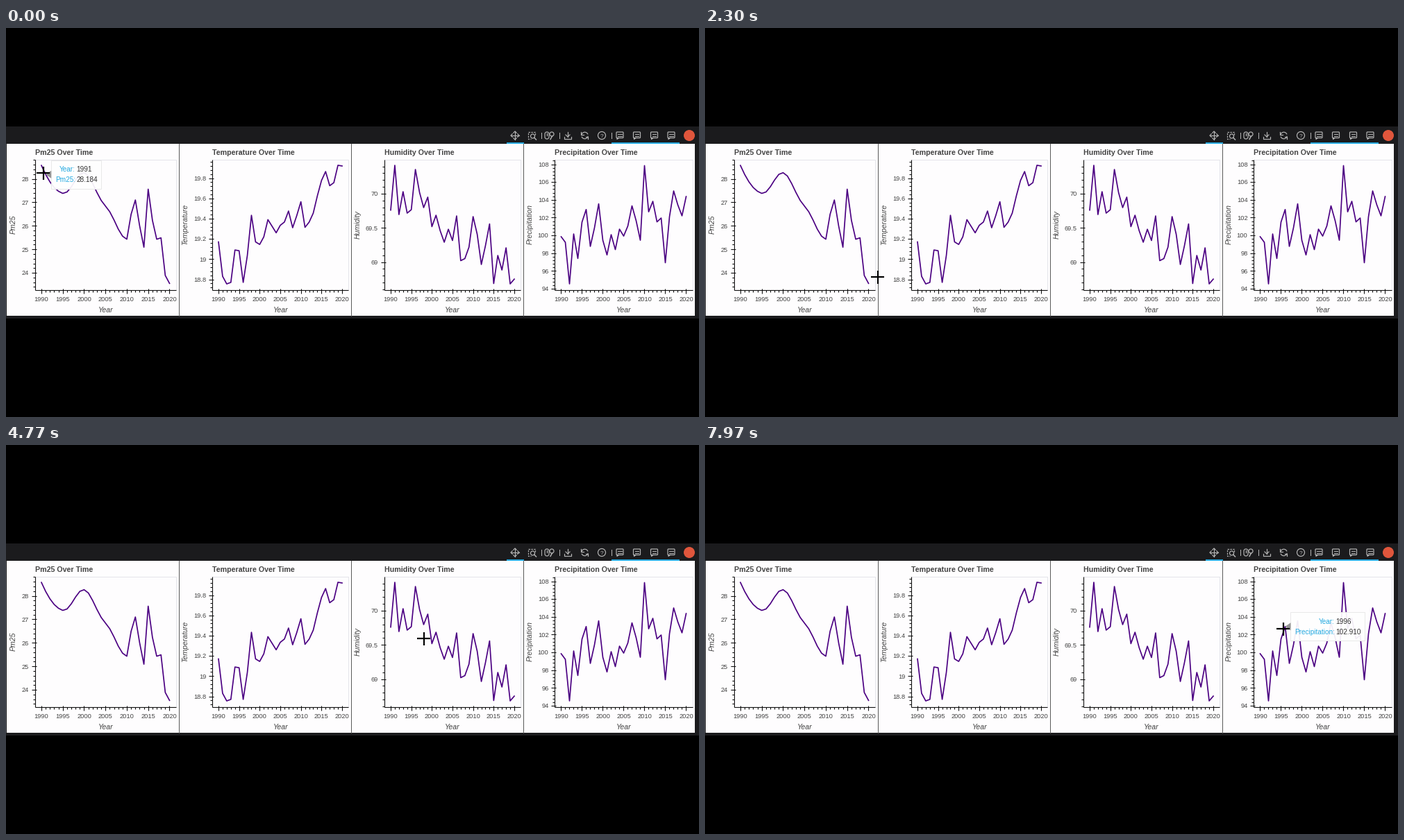
These frames come from a looping animation (998 by 561 pixels, 8 s). A matplotlib script:

```python
import numpy as np
import matplotlib.pyplot as plt
from matplotlib.animation import FuncAnimation
from matplotlib.collections import LineCollection
from matplotlib.patches import Arc, Circle, FancyBboxPatch, Polygon, Rectangle

W, H, DPI = 998, 561, 100
FRAMES, STEP = 250, 32
PX = 72 / DPI
INK, GREY, BLUE, INDIGO = "#444444", "#b4b4b4", "#26aae1", "#4b0082"
TOP, BOTTOM = 190, 377.5
HIT = 2.6

plt.rcParams["font.family"] = "Liberation Sans"
fig = plt.figure(figsize=(W / DPI, H / DPI), dpi=DPI, facecolor="black")
ax = fig.add_axes([0, 0, 1, 1])
ax.set_xlim(0, W)
ax.set_ylim(H, 0)
ax.axis("off")


def rect(x0, y0, x1, y1, color, **kw):
    return ax.add_patch(Rectangle((x0, y0), x1 - x0, y1 - y0, fc=color, lw=0, **kw))


def stroke(points, color=GREY, width=1.2, **kw):
    xs, ys = zip(*points)
    return ax.plot(xs, ys, color=color, lw=width * PX, **kw)[0]


def label(x, y, text, size, color=INK, **kw):
    return ax.text(x, y, text, fontsize=size * PX, color=color, **kw)


def ring(x, y, r):
    ax.add_patch(Circle((x, y), r, fill=False, ec=GREY, lw=1.2 * PX))


def round_box(x0, y0, x1, y1, r):
    shape = f"round,pad=0,rounding_size={r}"
    ax.add_patch(FancyBboxPatch((x0, y0), x1 - x0, y1 - y0, boxstyle=shape,
                                fill=False, ec=GREY, lw=1.2 * PX))


class Chart:
    """One line chart: frame edges, pixel scales, tick step and values."""

    def __init__(self, name, left, right, x_ends, y_ref, step, digits, base, values):
        self.name, self.left, self.right = name, left, right
        self.years = np.arange(1990, 2021)
        self.values = np.array(values)
        self.x = np.linspace(*x_ends, 31)
        self.ref, self.y0, self.scale = y_ref
        self.y = self.to_y(self.values)
        self.pts = np.column_stack([self.x, self.y])
        self.draw(step, digits, base)

    def to_y(self, v):
        return self.y0 + (self.ref - v) * self.scale

    def draw(self, step, digits, base):
        left, right = self.left, self.right
        mid = (left + right) / 2
        stroke([(left, TOP), (right, TOP), (right, BOTTOM)], "#e4e4ea", 1)
        label(left, 182.8, f"{self.name} Over Time", 10.65, weight="bold")
        label(mid, 410, "Year", 10.5, style="italic", ha="center")
        label(base, 283, self.name, 10.5, style="italic", rotation=90,
              rotation_mode="anchor", ha="center", va="baseline")

        segs = [[(left, TOP), (left, BOTTOM)], [(left, BOTTOM), (right, BOTTOM)]]
        for i, x in enumerate(self.x):
            major = i % 5 == 0
            segs.append([(x, BOTTOM - 2 * major), (x, BOTTOM + (5 if major else 3.3))])
            if major:
                label(x, 394.2, str(1990 + i), 9.3, ha="center")
        for k in range(-80, 81):
            v = self.ref + k * step / 5
            y = self.to_y(v)
            if not TOP <= y <= BOTTOM:
                continue
            major = k % 5 == 0
            segs.append([(left - (5 if major else 3.3), y), (left + 2 * major, y)])
            if major:
                text = f"{v:.{digits}f}"
                text = text.rstrip("0").rstrip(".") if digits else text
                label(left - 9, y + 3.3, text, 9.3, ha="right")
        ax.add_collection(LineCollection(segs, colors="#111111", linewidths=1.1 * PX))
        stroke(self.pts, INDIGO, 1.7, solid_joinstyle="round")

    def hit(self, p):
        """Index of the nearest point if p lies on the line, else None."""
        a, d = self.pts[:-1], np.diff(self.pts, axis=0)
        t = np.clip(((p - a) * d).sum(1) / (d * d).sum(1), 0, 1)
        gap = np.hypot(*(a + t[:, None] * d - p).T)
        if gap.min() > HIT:
            return None
        return int(np.hypot(*(self.pts - p).T).argmin())


# Page and toolbar
rect(0, 142, W, 419, "#1b1b1d")
rect(1, 167, 992, 415, "#fefdfe")
for x in (249, 497, 745):
    stroke([(x, 167), (x, 415)], "#5a5a5a", 1)
for x0, x1 in ((721, 746), (872, 970)):
    rect(x0, 165, x1, 167, BLUE)
for x in (771, 797, 872.5):
    stroke([(x, 151), (x, 159)], GREY, 1)


def pan_icon(x, y):
    stroke([(x - 6, y), (x + 6, y)])
    stroke([(x, y - 6), (x, y + 6)])
    for dx, dy in ((1, 0), (-1, 0), (0, 1), (0, -1)):
        tip = np.array([x + 6 * dx, y + 6 * dy])
        back, side = 2.2 * np.array([dx, dy]), 2.2 * np.array([dy, dx])
        stroke([tip - back + side, tip, tip - back - side])


def box_zoom_icon(x, y):
    stroke([(x + 5, y - 1), (x + 5, y - 5), (x - 5, y - 5), (x - 5, y + 5), (x - 1, y + 5)],
           linestyle=(0, (2, 1.2)))
    ring(x + 1, y + 1, 3)
    stroke([(x + 3.2, y + 3.2), (x + 6, y + 6)], width=1.5)


def wheel_zoom_icon(x, y):
    round_box(x - 6.5, y - 5, x - 0.5, y + 5, 2.9)
    stroke([(x - 3.5, y - 3), (x - 3.5, y - 0.5)])
    ring(x + 3.5, y - 2, 3)
    stroke([(x + 4, y + 1), (x + 1.5, y + 5.5)], width=1.5)


def save_icon(x, y):
    stroke([(x, y - 5.5), (x, y + 2)])
    stroke([(x - 3, y - 1), (x, y + 2), (x + 3, y - 1)])
    stroke([(x - 5, y + 2), (x - 5, y + 5), (x + 5, y + 5), (x + 5, y + 2)])


def reset_icon(x, y):
    for start in (10, 190):
        ax.add_patch(Arc((x, y), 9.5, 9.5, theta1=start, theta2=start + 150,
                         ec=GREY, lw=1.2 * PX))
    stroke([(x - 5, y - 5), (x - 5, y - 1.5), (x - 1.5, y - 1.5)])
    stroke([(x + 5, y + 5), (x + 5, y + 1.5), (x + 1.5, y + 1.5)])


def help_icon(x, y):
    ring(x, y, 5.5)
    label(x, y + 3, "?", 8.5, GREY, ha="center")


def hover_icon(x, y):
    round_box(x - 5, y - 5, x + 5, y + 3.5, 1)
    stroke([(x - 4, y + 3.5), (x - 4, y + 5.5), (x - 1.5, y + 3.5)])
    for dy in (-2, 0.5):
        stroke([(x - 2.8, y + dy), (x + 2.8, y + dy)], width=1)


pan_icon(733, 155)
box_zoom_icon(757.5, 155)
wheel_zoom_icon(782.5, 155)
save_icon(809, 155)
reset_icon(833.5, 155)
help_icon(858, 155)
for bx in (884, 908.5, 933.5, 958):
    hover_icon(bx, 155)
ax.add_patch(Circle((984, 155), 8, fc="#e0563c", lw=0))

charts = [
    Chart("Pm25", 42, 245, (51, 235.5), (28, 217.5, 33.9), 1, 0, 13.5, [
        28.57, 28.184, 27.87, 27.63, 27.47, 27.38, 27.44, 27.66, 27.95, 28.19, 28.26,
        28.12, 27.8, 27.42, 27.08, 26.84, 26.6, 26.25, 25.86, 25.56, 25.43, 26.49,
        27.1, 26.0, 25.09, 27.56, 26.23, 25.43, 25.49, 23.889, 23.55]),
    Chart("Temperature", 297.5, 493, (306, 484), (19.8, 216.5, 146), 0.2, 1, 261, [
        19.17, 18.83, 18.755, 18.77, 19.09, 19.083, 18.77, 19.035, 19.433, 19.17, 19.145,
        19.22, 19.39, 19.325, 19.26, 19.334, 19.366, 19.475, 19.31, 19.43, 19.567, 19.314,
        19.365, 19.454, 19.625, 19.776, 19.865, 19.725, 19.755, 19.927, 19.92]),
    Chart("Humidity", 545, 741, (554, 732), (70, 239, 98.5), 0.5, 1, 510, [
        69.76, 70.416, 69.695, 70.03, 69.716, 69.766, 70.355, 70.02, 69.797, 69.95, 69.518,
        69.685, 69.46, 69.29, 69.48, 69.315, 69.675, 69.02, 69.05, 69.218, 69.665, 69.406,
        68.964, 69.24, 69.558, 68.685, 69.096, 68.883, 69.208, 68.68, 68.75]),
    Chart("Precipitation", 790.5, 989, (799.5, 979.5), (108, 196.5, 12.82), 2, 0, 757.5, [
        99.85, 99.22, 94.54, 100.16, 97.4, 101.49, 102.91, 98.76, 100.86, 103.55, 99.45,
        97.8, 100.08, 98.4, 100.7, 99.92, 101.05, 103.32, 101.64, 99.45, 107.85, 102.65,
        103.83, 101.52, 101.95, 96.92, 102.1, 105.0, 103.43, 102.2, 104.37]),
]

# Tooltip and pointer
tip_box = rect(0, 0, 1, 1, "white", alpha=0.93, zorder=5)
tip_edge = ax.add_patch(Rectangle((0, 0), 1, 1, fill=False, ec="#e9e9e9", lw=PX, zorder=5))
arrow = ax.add_patch(Polygon([(0, 0)] * 3, fc="#959595", lw=0, zorder=6))
keys = [label(0, 0, "", 10, BLUE, ha="right", zorder=6) for _ in range(2)]
vals = [label(0, 0, "", 10, "#333333", zorder=6) for _ in range(2)]
tooltip = [tip_box, tip_edge, arrow, *keys, *vals]
arms = [stroke([(0, 0), (0, 0)], "black", 2.2, zorder=8, solid_capstyle="butt")
        for _ in range(2)]

# Pointer path: time in ms, x, y
PATH = np.array([
    (0, 54, 209), (110, 64, 222), (200, 76, 236), (300, 88, 237), (480, 110, 209),
    (620, 127, 229), (760, 143, 257), (900, 162, 290), (1000, 174, 304),
    (1130, 198, 304), (1230, 222, 304), (1330, 228, 357), (1900, 232, 359),
    (2300, 250, 359), (2700, 312, 366), (2950, 345, 325), (3200, 371, 301),
    (3500, 412, 276), (3870, 468, 269), (4350, 548, 262), (4800, 606, 280),
    (5200, 668, 308), (5600, 728, 323), (5900, 768, 308), (6350, 820, 278),
    (6700, 831, 265), (6850, 831, 265), (7050, 833, 265), (8000, 833, 265)])


def text_width(t):
    return t.get_window_extent().transformed(ax.transData.inverted()).width


def show_tooltip(chart, i):
    x, y = chart.pts[i]
    rows = [("Year:", str(chart.years[i])), (f"{chart.name}:", f"{chart.values[i]:.3f}")]
    for key, val, (k, v) in zip(keys, vals, rows):
        key.set_text(k)
        val.set_text(v)
    key_w = max(text_width(t) for t in keys)
    width = key_w + max(text_width(t) for t in vals) + 12.5
    side = 1 if x < (chart.left + chart.right) / 2 else -1
    edge = x + 8 * side
    x0 = edge if side > 0 else edge - width
    for r in (tip_box, tip_edge):
        r.set_bounds(x0, y - 20.5, width, 41)
    arrow.set_xy([(edge - 8 * side, y), (edge, y - 5.5), (edge, y + 5.5)])
    for key, val, dy in zip(keys, vals, (-4, 11)):
        key.set_position((x0 + 5.5 + key_w, y + dy))
        val.set_position((x0 + 7 + key_w, y + dy))


def update(frame):
    t = frame * STEP
    x, y = (round(float(np.interp(t, PATH[:, 0], PATH[:, c]))) for c in (1, 2))
    arms[0].set_data([x - 9.5, x + 9.5], [y, y])
    arms[1].set_data([x, x], [y - 9.5, y + 9.5])
    found = [(c, c.hit(np.array([x, y]))) for c in charts]
    found = [(c, i) for c, i in found if i is not None]
    for artist in tooltip:
        artist.set_visible(bool(found))
    if found:
        show_tooltip(*found[0])
    return tooltip + arms


anim = FuncAnimation(fig, update, frames=FRAMES, interval=STEP, repeat=True,
                     repeat_delay=0, blit=False)
plt.show()
```
